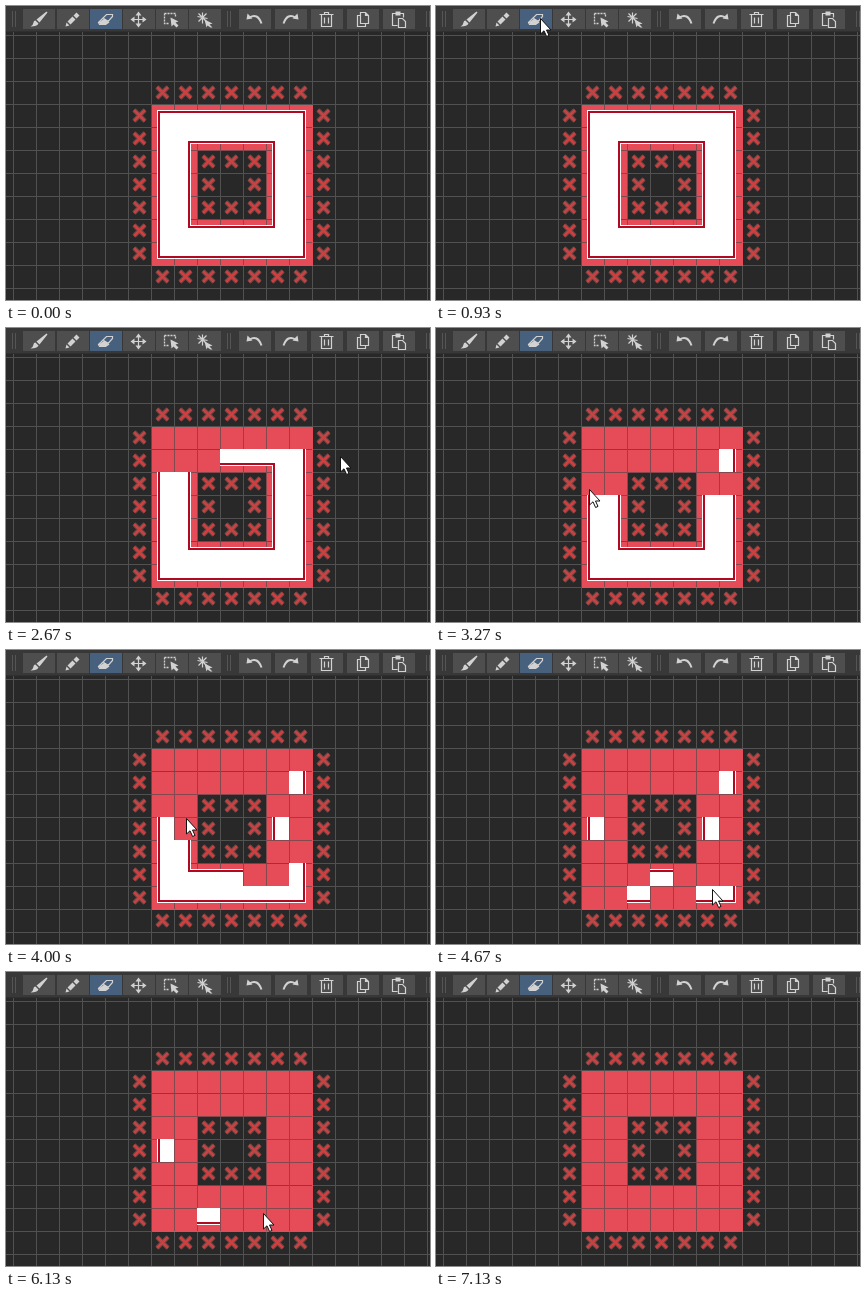
Write an HTML page with a canvas that moves like this. It is 424 by 294 pixels and loops after 7540 ms.

```html
<!DOCTYPE html>
<html lang="en">
<head>
<meta charset="utf-8">
<title>Tile eraser</title>
<style>
html, body { margin: 0; width: 100%; height: 100%; overflow: hidden; background: #282828; }
canvas { display: block; width: 424px; height: 294px; }
</style>
</head>
<body>
<canvas id="stage" width="424" height="294"></canvas>
<script>
const ctx = document.getElementById('stage').getContext('2d');
const W = 424, H = 294, LOOP = 7540, TICK = 1000 / 15;
const CELL = 23, LEFT = 145, TOP = 98, SIZE = 7;
const RED = '#e64b58', DARK = '#b00a22', GRID = '#515151', BACK = '#282828';

// Pointer keys: tick, x, y
const path = [
  [5, 23, -10], [11, 113, 12], [12, 113, 12], [15, 99, 12], [21, 99, 12],
  [23, 45, 48], [27, 153, 85], [31, 152, 125], [33, 190, 124], [34, 203, 126],
  [35, 182, 112], [36, 212, 108], [38, 285, 108], [40, 334, 128], [42, 288, 161],
  [44, 262, 132], [45, 225, 117], [46, 190, 130], [48, 139, 155], [49, 153, 161],
  [52, 225, 180], [54, 286, 180], [57, 268, 218], [58, 245, 215], [60, 180, 168],
  [61, 180, 196], [62, 159, 200], [63, 157, 224], [64, 185, 225], [65, 163, 246],
  [66, 228, 252], [69, 297, 228], [70, 276, 239], [72, 296, 255], [75, 277, 188],
  [78, 290, 117], [81, 290, 222], [83, 226, 225], [88, 324, 260], [90, 324, 258],
  [92, 257, 241], [93, 185, 239], [95, 147, 178], [99, 160, 181], [107, 55, 300]
];

// Tick at which each cell is wiped; 0 marks the hole
const wiped = [
  [29, 35, 35, 36, 37, 38, 38],
  [31, 32, 34, 45, 45, 44, 77],
  [48, 47, 0, 0, 0, 43, 42],
  [95, 60, 0, 0, 0, 75, 54],
  [62, 61, 0, 0, 0, 56, 55],
  [63, 64, 64, 83, 58, 57, 69],
  [65, 65, 93, 66, 67, 71, 72]
];

const icons = [
  // brush
  { x: 32, fill: 'M8-8 9-7 1 3-2 0ZM-3 1 0 4Q-1 7-8 7-5 5-5 3-5 1-3 1Z' },
  // marker
  { x: 66, fill: 'M4-7 7-4 4-1 1-4ZM0-3 3 0-2 5-5 2ZM-6 3-3 6-7 7Z' },
  // eraser
  { x: 99, fill: 'M-1-1 4 3 1 5H-5L-7 3Z', line: 'M-7 3 1-5H7V-3L0 5H-6ZM-2-1 3 2' },
  // move
  { x: 132, fill: 'M0-8 3-4H-3ZM0 8 3 4H-3ZM-8 0-4-3V3ZM8 0 4-3V3Z', line: 'M-5 0H5M0-5V5' },
  // box select
  { x: 165, fill: 'M-1-2 7 2 4 3 7 6 5 8 2 5 0 7Z', dash: 'M-7-6H4V-3M-7-6V4H-2' },
  // magic select
  { x: 198, fill: 'M0 0 8 4 5 5 8 8 6 8 3 6 2 8Z', line: 'M-7-3 3-1M-2-7V4M-6-6 2 2M-6 2 2-6' },
  // undo, redo
  { x: 248, fill: 'M-8 0-7-6-2-1Z', bold: 'M-5-2Q3-7 7 4' },
  { x: 284, fill: 'M8 0 7-6 2-1Z', bold: 'M5-2Q-3-7-7 4' },
  // delete
  { x: 320, line: 'M-7-5H7M-2-5V-7H2V-5M-5-5V7H5V-5M-2-2V4M2-2V4' },
  // copy
  { x: 356, line: 'M-2-7H3L6-4V4H-2ZM3-7V-4H6M-2-4H-5V7H3V4' },
  // paste
  { x: 392, fill: 'M-3-8H2V-4H-3Z', line: 'M-1 6H-6V-6H5V-2M0-1H4L7 2V8H0Z' }
];

function box(color, x, y, w, h) {
  ctx.fillStyle = color;
  ctx.fillRect(x, y, w, h);
}

function stroke(shape, color, width) {
  ctx.strokeStyle = color;
  ctx.lineWidth = width;
  ctx.stroke(shape);
}

function drawGrid() {
  for (let x = 7; x < W; x += CELL) box(GRID, x, 26, 1, H);
  for (let y = 29; y < H; y += CELL) box(GRID, 0, y, W, 1);
}

const crossShape = new Path2D('M-5.5-5.5 5.5 5.5M5.5-5.5-5.5 5.5');
function cross(col, row) {
  ctx.save();
  ctx.translate(LEFT + col * CELL + 11.5, TOP + row * CELL + 11.5);
  stroke(crossShape, '#684646', 4.6);
  stroke(crossShape, '#cb4040', 2.6);
  ctx.restore();
}

function drawCrosses() {
  for (let i = 0; i < SIZE; i++) {
    cross(i, -1);
    cross(i, SIZE);
    cross(-1, i);
    cross(SIZE, i);
  }
  for (let r = 2; r < 5; r++)
    for (let c = 2; c < 5; c++)
      if (r !== 3 || c !== 3) cross(c, r);
}

function eachCell(fn) {
  wiped.forEach((row, r) => row.forEach((tick, c) => {
    if (tick) fn(LEFT + c * CELL, TOP + r * CELL, tick);
  }));
}

function drawTiles(now) {
  const span = SIZE * CELL;
  eachCell((x, y) => box(RED, x + 1, y + 1, CELL, CELL));
  for (let i = 1; i < SIZE; i++) {
    const inHole = i > 2 && i < 5;
    const parts = inHole ? [[1, 46], [116, 45]] : [[1, span - 1]];
    for (const [at, len] of parts) {
      box('#84484f', LEFT + i * CELL, TOP + at, 1, len);
      box(i === 1 || i === 5 ? '#a52c3e' : '#84484f', LEFT + at, TOP + i * CELL, len, 1);
    }
  }

  ctx.save();
  ctx.beginPath();
  eachCell((x, y, tick) => {
    if (now < tick) ctx.rect(x, y, CELL + (x === 283), CELL);
  });
  ctx.clip();
  const ring = new Path2D('M151 104H300V253H151ZM185 138V219H266V138Z');
  ctx.fillStyle = '#fff';
  ctx.fill(ring, 'evenodd');
  ctx.lineJoin = 'miter';
  stroke(new Path2D('M153 106H298V251H153ZM183 136H268V221H183Z'), DARK, 2);
  ctx.restore();
}

function drawIcon(icon) {
  const color = '#d2d2d2';
  ctx.save();
  ctx.translate(icon.x + .5, 13.5);
  ctx.fillStyle = color;
  if (icon.line) stroke(new Path2D(icon.line), color, 1.2);
  if (icon.bold) stroke(new Path2D(icon.bold), color, 2);
  if (icon.dash) {
    ctx.setLineDash([2, 1]);
    stroke(new Path2D(icon.dash), color, 1.3);
  }
  if (icon.fill) ctx.fill(new Path2D(icon.fill));
  ctx.restore();
}

function drawToolbar() {
  box('#383838', 0, 0, W, 26);
  box('#2f2f2f', 0, 25, W, 1);
  for (const x of [6, 221, 420]) {
    box('#555', x, 5, 1, 16);
    box('#555', x + 3, 5, 1, 16);
  }
  icons.forEach((icon, i) => {
    box(i === 2 ? '#46607d' : '#4e4e4e', icon.x - 15, 3, 32, 20);
    drawIcon(icon);
  });
}

function pointerAt(tick) {
  const i = path.findIndex(key => key[0] > tick);
  if (i < 1) return null;
  const [t0, x0, y0] = path[i - 1], [t1, x1, y1] = path[i];
  const k = (tick - t0) / (t1 - t0);
  return [Math.round(x0 + (x1 - x0) * k), Math.round(y0 + (y1 - y0) * k)];
}

const arrow = new Path2D('M.5.5V16L4 12.8 6.6 18.5 9 17.4 6.5 12H11Z');
function drawPointer(tick) {
  const at = pointerAt(tick);
  if (!at) return;
  ctx.save();
  ctx.translate(...at);
  ctx.fillStyle = '#fff';
  ctx.fill(arrow);
  stroke(arrow, '#111', 1);
  ctx.restore();
}

const start = performance.now();
function draw() {
  const time = (performance.now() - start) % LOOP;
  const tick = Math.floor((time + 4) / TICK);
  box(BACK, 0, 0, W, H);
  drawGrid();
  drawTiles(tick);
  drawCrosses();
  drawToolbar();
  drawPointer(tick);
  requestAnimationFrame(draw);
}
draw();
</script>
</body>
</html>
```
